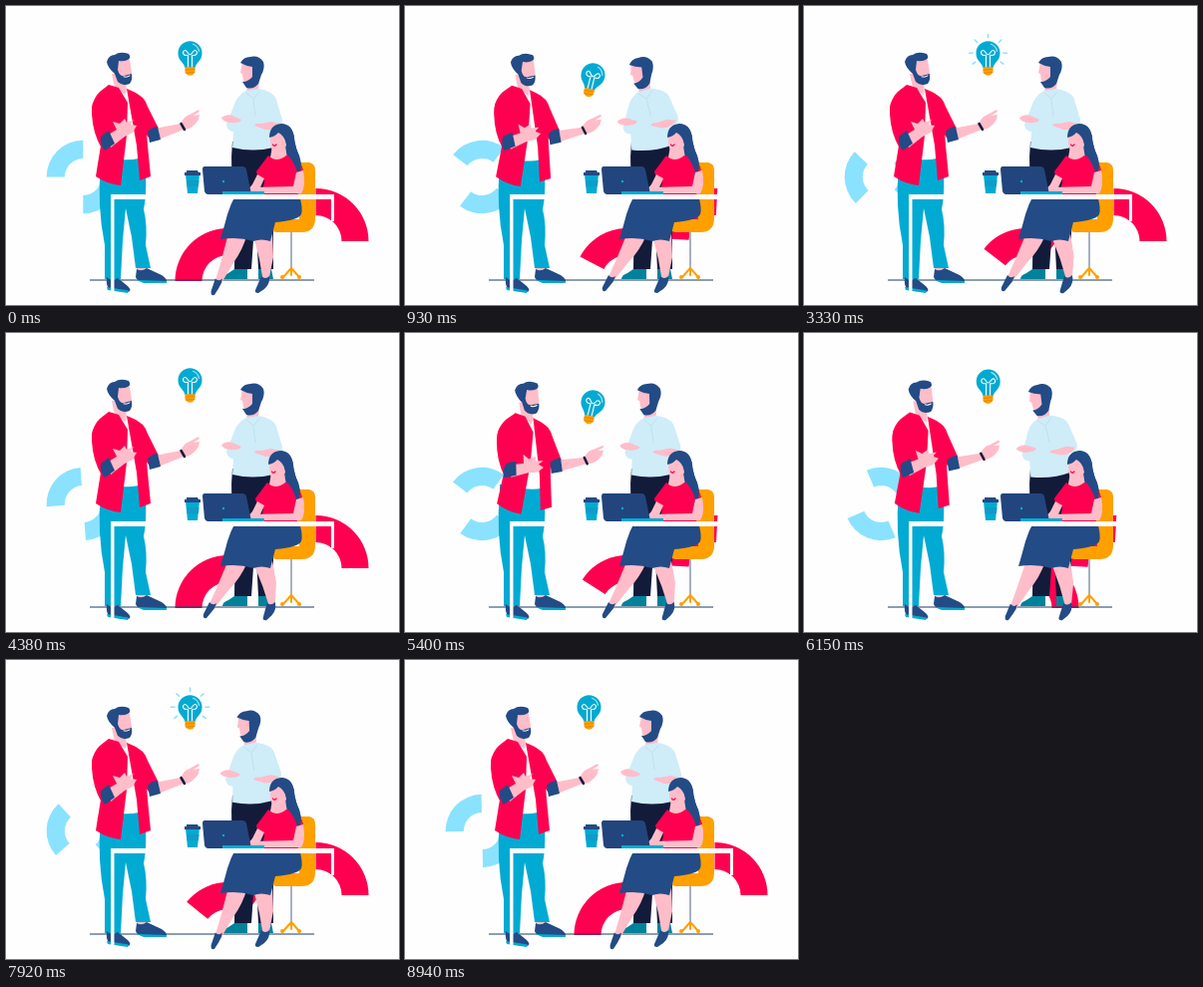
Animation, 394 px wide and 300 px high, one loop 8.97 s. Source, as an HTML page:

```html
<!DOCTYPE html>
<html lang="en">
<head>
<meta charset="utf-8">
<title>Team idea</title>
<style>
html, body { margin: 0; width: 100%; height: 100%; overflow: hidden; background: #fefefe; }
svg { display: block; width: 100vw; height: 100vh; }
.red { fill: #ff0050; } .navy { fill: #234b85; } .dark { fill: #131b3a; }
.skin { fill: #ffbdc9; } .teal { fill: #00aad2; } .sky { fill: #8ae2ff; }
.shirt { fill: #cfecf9; } .orange { fill: #ff9f00; } .white { fill: #fefefe; }
.line { fill: none; stroke-linecap: round; stroke-linejoin: round; }
</style>
</head>
<body>
<svg viewBox="0 0 394 300">
  <defs>
    <clipPath id="aboveFloor"><path d="M150 200H300V276H150Z"/></clipPath>
    <clipPath id="aboveSeat"><path d="M240 170H380V236H240Z"/></clipPath>
  </defs>

  <g id="blueRing" class="sky"></g>
  <g clip-path="url(#aboveFloor)"><g id="floorRing" class="red"></g></g>
  <g clip-path="url(#aboveSeat)"><g id="seatRing" class="red"></g></g>
  <path d="M84 275H309" stroke="#1f3f66" stroke-width="1.1"/>

  <!-- standing colleague -->
  <path class="dark" d="M227 136H266Q271 170 268 200L268 264H253L250 206L246 264H229L230 196Q224 166 227 136Z"/>
  <path d="M217 274Q217 270 223 268L229 264H242V274ZM253 274V264H266L268 274Z" fill="#00829a"/>
  <g id="colleague">
    <path class="skin" d="M243 72H254L253 86L247 93L241 87Z"/>
    <path class="shirt" d="M241 85L253 83Q269 86 271 94L277 114Q278 123 268 123L268 142Q248 147 227 142L228 126Q222 126 221 119L230 96Q234 88 241 85Z"/>
    <path class="skin" d="M237 56L247 57L249 72Q244 77 238 75L237 68L235 67Z"/>
    <path class="navy" d="M235 57Q238 51 245 51Q253 49 258 56Q260 62 256 69L253 78Q248 84 241 82L237 76Q243 76 247 71L247 61Q240 60 235 57Z"/>
    <path class="skin" d="M216 112Q221 108 227 110L236 114Q235 117 230 117Q222 118 217 114ZM275 118Q270 125 260 124L249 120Q250 117 256 118L266 116Z"/>
    <path class="line" d="M241 87L248 93L254 86M248 94L250 110" stroke="#b9deee" stroke-width=".8"/>
  </g>

  <!-- chair -->
  <path d="M286 225V265" stroke="#a9b0c2" stroke-width="2"/>
  <path class="line" d="M278 272L286 263L294 272M286 263V270" stroke="#ff9f00" stroke-width="2"/>
  <g class="orange"><circle cx="277" cy="272" r="2"/><circle cx="294" cy="272" r="2"/>
  <path d="M290 157H304Q310 158 310 165V213Q310 227 296 227H271Q265 226 265 219V214H294Z"/></g>

  <!-- seated colleague -->
  <g id="farLeg">
    <path class="skin" d="M222 230H242Q235 246 224 257L209 276L203 274L212 254Z"/>
    <path class="navy" d="M204 270Q207 274 211 271Q210 276 206 280L201 286Q197 287 198 282Z"/>
  </g>
  <g id="nearLeg">
    <path class="skin" d="M247 226H267L268 252L263 277H258L254 254Z"/>
    <path class="navy" d="M256 271Q260 275 264 271Q265 279 259 284L253 288Q249 288 250 285Z"/>
  </g>
  <path class="navy" d="M230 190H294Q298 203 296 209Q293 215 270 217L265 236Q256 233 248 236Q232 231 215 234Q218 224 222 209Q225 199 230 190Z"/>
  <path class="white" d="M215 190H235L228 194H215Z"/>
  <g id="womanTop">
    <path class="navy" d="M267 128Q270 117 280 119Q289 123 289 135Q291 144 294 151Q298 163 292 172L268 150Z"/>
    <path class="skin" d="M267 140H280L282 153L272 159L265 152Z"/>
    <path class="red" d="M263 150Q271 158 281 150L290 152Q296 156 298 165L291 168L293 190H254Q259 181 259 174Q251 171 251 166Z"/>
    <path class="skin" d="M266 128Q275 123 280 132L281 140Q276 149 270 147Q265 144 265 135Z"/>
    <path class="navy" d="M264 132Q264 119 276 118Q287 118 289 132Q290 142 294 150Q298 162 293 171Q291 160 284 151Q281 144 281 138Q279 130 273 127Q270 131 264 132Z"/>
    <path class="line" d="M267.5 139Q269 141.500 271 139" stroke="#ff0050" stroke-width="1.3"/>
  </g>
  <path class="skin" d="M291 167L298 165Q301 181 296 188L248 188Q243 185 247 182L288 181ZM252 169L259 173L255 182L247 188L241 186L247 179Z"/>

  <!-- laptop and cup -->
  <path d="M199 161H237Q240 161 241 164L246 189H202Q200 189 199 186L197 164Q197 161 199 161Z" fill="#22457d"/>
  <circle class="teal" cx="218" cy="176" r="1.2"/>
  <path class="teal" d="M217 186H259V189.5H217ZM180 169H194L192 188H182Z"/>
  <path class="navy" d="M181 165H192L193 167H195V170H179V167H181Z"/>
  <path d="M181 175H193.5L193 181H181.700Z" fill="#0f9cc6"/>

  <!-- speaker -->
  <path class="skin" d="M103 269h11v10h-11zM131 258h10v9h-10z"/>
  <path class="teal" d="M95 152H139Q142 185 138 204Q142 220 140 240L145 263H130L126 232L120 203L117 235L115 274H99L99 240Q91 200 95 160Z"/>
  <path class="navy" d="M101 272Q106 277 112 273L122 281Q127 286 122 287L103 284Q100 279 101 272ZM131 264Q136 267 141 263L156 270Q162 274 161 277H139Q131 276 130 272Z"/>
  <path class="teal" d="M101 282L123 285.5L122 288L102 285ZM131 275L161 276V278H138Z"/>
  <g id="speaker">
    <path class="white" d="M111 83H124L133 153Q125 155 116 154Z"/>
    <path class="skin" d="M106 68H117L121 83L120 89L109 82Z"/>
    <path class="red" d="M103 79L113 82L122 97L121 130L115 180Q102 179 90 171L95 140L87 112Q84 96 94 86ZM121 83L128 86Q136 89 139 100L142 140L145 171L134 175L131 140Z"/>
    <path class="skin" d="M110 55Q118 50 124 54L126 67L125 74Q118 80 111 72Z"/>
    <path class="navy" d="M101 56Q103 49 109 49Q114 45 123 48Q126 52 122 54Q118 56 113 55L112 64Q114 71 118 70L126 68Q127 74 124 78Q117 81 112 76L109 68Q102 62 101 56Z"/>
    <path class="line" d="M118 71Q121 72 124 70" stroke="#fefefe" stroke-width="1"/>
    <g id="rightArm">
      <path class="red" d="M129 88Q138 89 142 101L153 123L143 132Q135 122 130 110Z"/>
      <path class="skin" d="M149 123L175 118Q179 110 184 109L193 104L194 106L188 110L194 109L193 114Q187 124 178 124L153 134Z"/>
      <path class="navy" d="M142 126Q147 121 152 121L155 134L144 137Z"/>
      <path class="line" d="M175.500 118L179 124" stroke="#131b3a" stroke-width="2.5"/>
    </g>
    <path class="red" d="M92 90Q101 98 102 127L96 143Q87 128 86 108Q85 96 92 90Z"/>
    <g id="forearm">
      <path class="skin" d="M101 130L111 124L107 116L114 118L119 113L121 117L128 114L125 119L131 120L127 127L119 131L105 142Z"/>
      <path class="navy" d="M95 131L103 125L109 138L99 145Q94 140 95 131Z"/>
    </g>
  </g>

  <!-- table -->
  <path class="white" d="M105 189H329V216H326V194H108.5V288H105Z"/>

  <!-- idea -->
  <g id="rays" class="line" stroke="#8ae2ff" stroke-width="1.5"></g>
  <g id="bulb">
    <path class="teal" d="M-12 0A12 12 0 1 1 12 0C12 8 6 9 5 15H-5C-6 9 -12 8 -12 0Z"/>
    <path class="line" d="M-2 14V2Q-7 3 -7 -1Q-5 -5 -2 0Q0 3 2 0Q5 -5 7 -1Q7 3 2 2V14" stroke="#fefefe" stroke-width="1.1"/>
    <path class="line" d="M3 -9Q8 -7 9 -2" stroke="#9be4f5" stroke-width="1.2"/>
    <path class="orange" d="M-5 14H5V19Q3 22.500 0 22.500Q-3 22.500 -5 19Z"/>
    <path d="M-5 17L5 16M-4.5 20L4.5 19" stroke="#d97d00" stroke-width=".7"/>
  </g>
</svg>
<script>
const LOOP = 8970;
const $ = id => document.getElementById(id);

const polar = (x, y, r, deg) => {
  const a = deg * Math.PI / 180;
  return `${x + r * Math.cos(a)} ${y + r * Math.sin(a)}`;
};

function quarterRing(x, y, outer, inner, start) {
  const end = start + 90;
  return `<path d="M${polar(x, y, outer, start)}A${outer} ${outer} 0 0 1 ${polar(x, y, outer, end)}` +
    `L${polar(x, y, inner, end)}A${inner} ${inner} 0 0 0 ${polar(x, y, inner, start)}Z"/>`;
}

// Sine-eased interpolation through [time, value] pairs.
function track(t, keys) {
  const i = keys.findIndex(key => key[0] > t);
  if (i === 0) return keys[0][1];
  if (i < 0) return keys[keys.length - 1][1];
  const [t0, a] = keys[i - 1], [t1, b] = keys[i];
  return a + (b - a) * (1 - Math.cos(Math.PI * (t - t0) / (t1 - t0))) / 2;
}

// Rise-and-fall moves, each given as [start, full, leave, end].
const swings = (...moves) => moves.flatMap(([a, b, c, d]) => [[a, 0], [b, 1], [c, 1], [d, 0]]);

const motion = {
  seat: swings([0, 930, 1670, 2700], [4480, 5430, 6430, 7430]),
  floor: swings([540, 1590, 2750, 3800], [4970, 6020, 7350, 8400]),
  lean: swings([350, 1450, 1500, 2300], [4480, 5400, 5700, 6500]),
  drop: swings([0, 950, 1350, 2050], [4480, 5400, 5600, 6250]),
  glow: swings([2000, 2250, 3650, 4000], [6250, 6450, 8130, 8350]),
  colleague: swings([200, 850, 1350, 2050], [5100, 6100, 7500, 8200]),
  farFoot: swings([200, 800, 5800, 6500]),
  nearFoot: swings([2800, 3500, 5900, 6600]),
  woman: swings([300, 900, 1500, 2100], [3500, 4200, 5500, 6300])
};

const turn = (id, deg, x, y, dx = 0, dy = 0) =>
  $(id).setAttribute('transform', `translate(${dx} ${dy}) rotate(${deg} ${x} ${y})`);

$('blueRing').innerHTML = [180, 0].map(a => quarterRing(77.3, 171.5, 36.7, 18.5, a)).join('');
$('floorRing').innerHTML = quarterRing(222.5, 276, 53, 26, 180);
$('seatRing').innerHTML = quarterRing(310.5, 236, 53, 26, 270);

function draw(t) {
  const p = {};
  for (const name in motion) p[name] = track(t, motion[name]);

  turn('blueRing', 360 * t / LOOP, 77.3, 171.5);
  turn('floorRing', 90 * p.floor, 222.5, 276);
  turn('seatRing', -87 * p.seat, 310.5, 236);

  turn('speaker', 3.5 * p.lean, 118, 172, 2 * p.lean, 2 * p.lean);
  turn('forearm', 20 * p.lean, 99, 136);
  turn('rightArm', 2 * p.lean, 134, 95);
  turn('colleague', -7 * p.colleague, 247, 141);
  turn('womanTop', 0, 0, 0, -p.woman);
  turn('farLeg', 8 * (p.farFoot - 1), 232, 230);
  turn('nearLeg', -8 * p.nearFoot, 258, 230);

  turn('bulb', 14 * p.drop, 0, 0, 184.5 + 4 * p.drop, 47.3 + 22 * p.drop);
  const reach = p.glow * (3.7 + 0.4 * Math.sin(t / 140));
  $('rays').setAttribute('opacity', p.glow);
  $('rays').innerHTML = [-125, -90, -45, 0, 45, 90, 125].map(a =>
    `<path d="M${polar(184.5, 47.3, 15.5, a - 90)}L${polar(184.5, 47.3, 15.5 + reach, a - 90)}"/>`).join('');
}

const started = performance.now();
function frame() {
  draw((performance.now() - started) % LOOP);
  requestAnimationFrame(frame);
}
draw(0);
requestAnimationFrame(frame);
</script>
</body>
</html>
```
